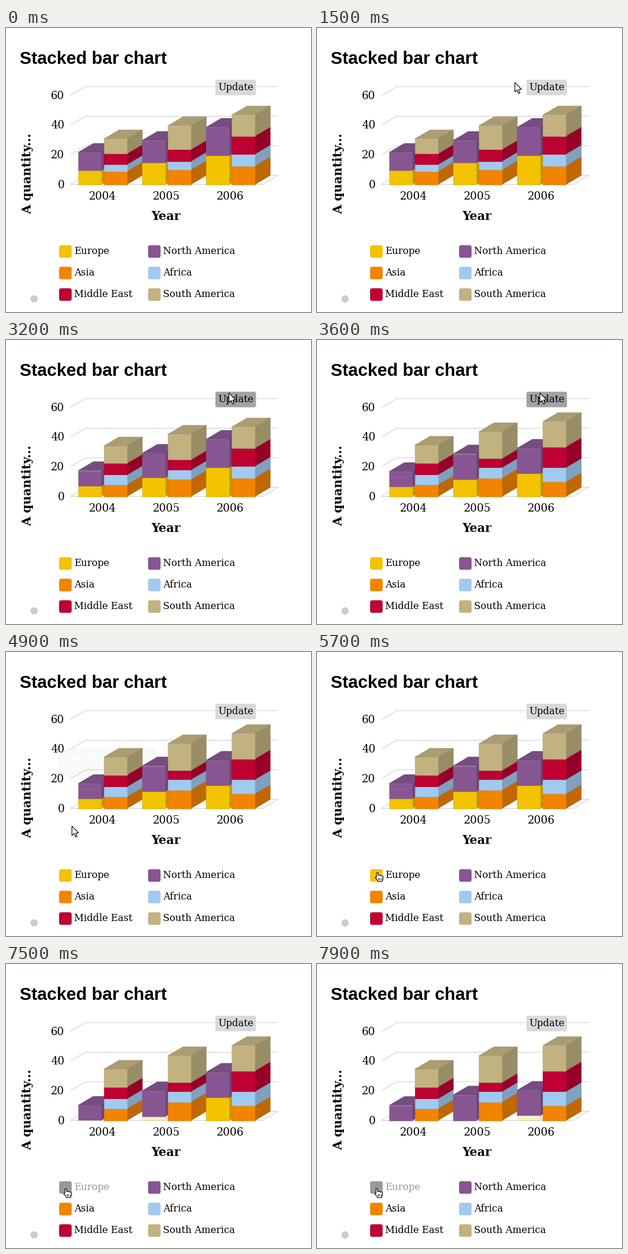
These frames come from a looping animation (511x475 px, 8000 ms). A matplotlib script:

```python
import numpy as np
import matplotlib.pyplot as plt
from matplotlib.animation import FuncAnimation
from matplotlib.colors import to_rgb
from matplotlib.patches import Circle, FancyBboxPatch, PathPatch, Polygon
from matplotlib.path import Path

W, H, DPI = 511, 475, 64
STEP, LOOP = 100, 8000
PT = 72 / DPI

BASE, TICK = 261.5, 49.5
DX, DY = 25.5, -15
BAR_W = 39.2
YEARS = ["2004", "2005", "2006"]
GROUP_X = [120.8, 228, 335.2]

# name, colour, segment heights before and after the update
EUROPE = ("Europe", "#f3c300", [24, 36.5, 48.5], [16.5, 28.5, 38.5])
NORTH = ("North America", "#875692", [29.5, 37, 47], [25, 42.5, 42])
ASIA = ("Asia", "#f38400", [22, 24.5, 31], [19.5, 31, 24.5])
AFRICA = ("Africa", "#a1caf1", [11.5, 14.5, 20], [17, 17.5, 24])
MIDEAST = ("Middle East", "#be0032", [18, 19.5, 30], [19.5, 15, 34.5])
SOUTH = ("South America", "#c2b280", [24.5, 39.5, 35], [29.5, 44.5, 42])
STACKS = [(0, [EUROPE, NORTH]), (43, [ASIA, AFRICA, MIDEAST, SOUTH])]
HIDE_START = [7200, 7350, 7740]

# time, x, y of the pointer's tip
POINTER = np.array([
    (700, 87.5, 23.5), (900, 130, 62), (1100, 205, 112), (1200, 245, 118.5),
    (1400, 314, 100), (1500, 331.5, 91), (2000, 372.5, 89), (2400, 372.5, 89),
    (2500, 374, 89.5), (2600, 373.5, 88.5), (4100, 373.5, 88.5),
    (4200, 330, 97), (4300, 255, 119), (4400, 185, 138), (4500, 149.5, 144),
    (4600, 149.5, 144), (4700, 137, 195), (4800, 120, 250),
    (4900, 110.5, 291), (5100, 103, 325), (5500, 97, 364.5),
    (5700, 101, 368), (6200, 101, 368), (6600, 100, 376), (6800, 100, 376),
    (6900, 100, 375)])

ARROW = np.array([(0, 0), (0, 16), (3.7, 12.6), (6.2, 18.6), (8.6, 17.6),
                  (6.2, 11.8), (11.2, 11.8)])
HAND = np.array([(-1.3, 1.2), (0, .4), (1.3, 1.2), (1.3, 5.5), (2.7, 5),
                 (4.2, 5.8), (5.7, 5.6), (7.2, 6.6), (8.7, 6.4), (9.8, 7.8),
                 (9.8, 11), (8.2, 15.8), (1.2, 15.8), (-.3, 12.8),
                 (-3.3, 9.6), (-2.8, 8), (-1.3, 9)])


def shade(color, k):
    return tuple(k * c for c in to_rgb(color))


def mix(a, b, p):
    return tuple((1 - p) * u + p * v for u, v in zip(to_rgb(a), to_rgb(b)))


def ease_out(p):
    return 1 - (1 - min(max(p, 0), 1)) ** 3


def line(*pts):
    xs, ys = zip(*pts)
    ax.plot(xs, ys, color="#c9c9c9", lw=.9 * PT, zorder=1)


def label(x, y, s, size, ha="left", **kw):
    kw = {"family": "DejaVu Serif", "va": "baseline", "color": "black",
          "zorder": 5, **kw}
    return ax.text(x, y, s, fontsize=size * PT, ha=ha, **kw)


def box(x, y, w, h, r, **kw):
    style = f"round,pad=0,rounding_size={r}"
    return ax.add_patch(FancyBboxPatch((x, y), w, h, boxstyle=style, **kw))


def closed(pts):
    return Path(np.vstack([pts, pts[:1]]),
                [Path.MOVETO] + [Path.LINETO] * (len(pts) - 1) + [Path.CLOSEPOLY])


fig = plt.figure(figsize=(W / DPI, H / DPI), dpi=DPI, facecolor="white")
ax = fig.add_axes([0, 0, 1, 1])
ax.set_xlim(0, W)
ax.set_ylim(H, 0)
ax.axis("off")

# axes and texts
for i in range(4):
    y = BASE - i * TICK
    line((108, y), (108 + DX, y + DY), (455.5, y + DY))
    label(98, y + 6, str(20 * i), 18, "right")
line((108, BASE), (430, BASE), (455.5, BASE + DY))
for x, year in zip(GROUP_X, YEARS):
    label(x + 40.8, 287, year, 18, "center")
label(23, 60, "Stacked bar chart", 29.4, family="Liberation Sans", weight="bold")
label(268, 321, "Year", 20, "center", weight="bold")
label(36, 243.5, "A quantity...", 20, "center", va="center",
      rotation=90, weight="bold")
ax.add_patch(Circle((47, 453), 6, fc="#cccccc", ec="none"))

# legend
entries = {}
for col, names in enumerate([(EUROPE, ASIA, MIDEAST), (NORTH, AFRICA, SOUTH)]):
    for row, (name, color, *_) in enumerate(names):
        x, y = 89 + 149 * col, 363.3 + 36 * row
        mark = box(x, y, 21, 21, 3.5, fc=color, ec="none", zorder=4)
        entries[name] = mark, label(x + 25, y + 14.7, name, 16)

# fading tooltip
tip = box(87, 161, 164, 49, 3, fc="#87b073", ec="none", zorder=1.5)
tip_text = label(100, 183, "North America", 16, color="white", weight="bold",
                 zorder=1.6)

# bars: side, top and front of every segment, back to front
bars = []
for i, gx in enumerate(GROUP_X):
    for dx, stack in STACKS:
        for series in stack:
            faces = []
            for k in (.79, .88, 1):
                color = shade(series[1], k)
                face = Polygon(np.zeros((4, 2)), closed=True, fc=color,
                               ec=shade(color, .85), lw=.5 * PT,
                               joinstyle="round", zorder=2)
                faces.append(ax.add_patch(face))
            bars.append((i, gx + dx, series, faces))

button = box(350.3, 86, 69, 27, 3, fc="#d9d9d9", ec="white", lw=PT, zorder=3)
label(384.6, 104.3, "Update", 16, "center")

pointer_style = dict(fc="white", ec="black", lw=1.1 * PT, zorder=9)
arrow = ax.add_patch(PathPatch(closed(ARROW), **pointer_style))
hand = ax.add_patch(PathPatch(closed(HAND), **pointer_style))
fingers, = ax.plot([], [], color="black", lw=.9 * PT, zorder=10)


def height(series, i, t):
    name, _, old, new = series
    h = old[i] + (new[i] - old[i]) * ease_out((t - 3000 - 100 * i) / 400)
    return h * (1 - hidden(i, t)) if name == "Europe" else h


def hidden(i, t):
    return ease_out((t - HIDE_START[i]) / 400)


def draw_bars(t):
    floor = {}
    for i, x, series, (side, top, front) in bars:
        y0 = floor.get(x, BASE)
        y1 = floor[x] = y0 - height(series, i, t)
        x1 = x + BAR_W
        side.set_xy([(x1, y0), (x1, y1), (x1 + DX, y1 + DY), (x1 + DX, y0 + DY)])
        top.set_xy([(x, y1), (x1, y1), (x1 + DX, y1 + DY), (x + DX, y1 + DY)])
        front.set_xy([(x, y0), (x, y1), (x1, y1), (x1, y0)])
        if series is EUROPE:
            for face in (side, top, front):
                face.set_alpha(1 - hidden(i, t))


def draw_pointer(t):
    x, y = (np.interp(t, POINTER[:, 0], POINTER[:, k]) for k in (1, 2))
    pressing = t >= 5600
    arrow.set_visible(700 <= t < 5600)
    hand.set_visible(pressing)
    fingers.set_visible(pressing)
    arrow.set_path(closed(ARROW + (x, y)))
    hand.set_path(closed(HAND + (x, y)))
    fx, fy = [], []
    for k in (2.2, 4.4, 6.6):
        fx += [x + k, x + k, np.nan]
        fy += [y + 10, y + 13, np.nan]
    fingers.set_data(fx, fy)
    over = t >= 700 and 350 <= x <= 419 and 86 <= y <= 113
    button.set_facecolor("#a2a2a2" if over else "#d9d9d9")


def update(frame):
    t = frame * STEP
    draw_bars(t)
    draw_pointer(t)
    glow = np.interp(t, [4600, 4800, 4900, 5000], [0, .1, .05, 0])
    tip.set_alpha(glow)
    tip_text.set_alpha(min(1, 20 * glow))
    mark, text = entries["Europe"]
    p = np.interp(t, [7200, 7500], [0, 1])
    mark.set_facecolor(mix("#f3c300", "#999999", p))
    text.set_color(mix("black", "#999999", p))
    return []


anim = FuncAnimation(fig, update, frames=LOOP // STEP, interval=STEP,
                     repeat=True, repeat_delay=0, blit=False)
plt.show()
```
